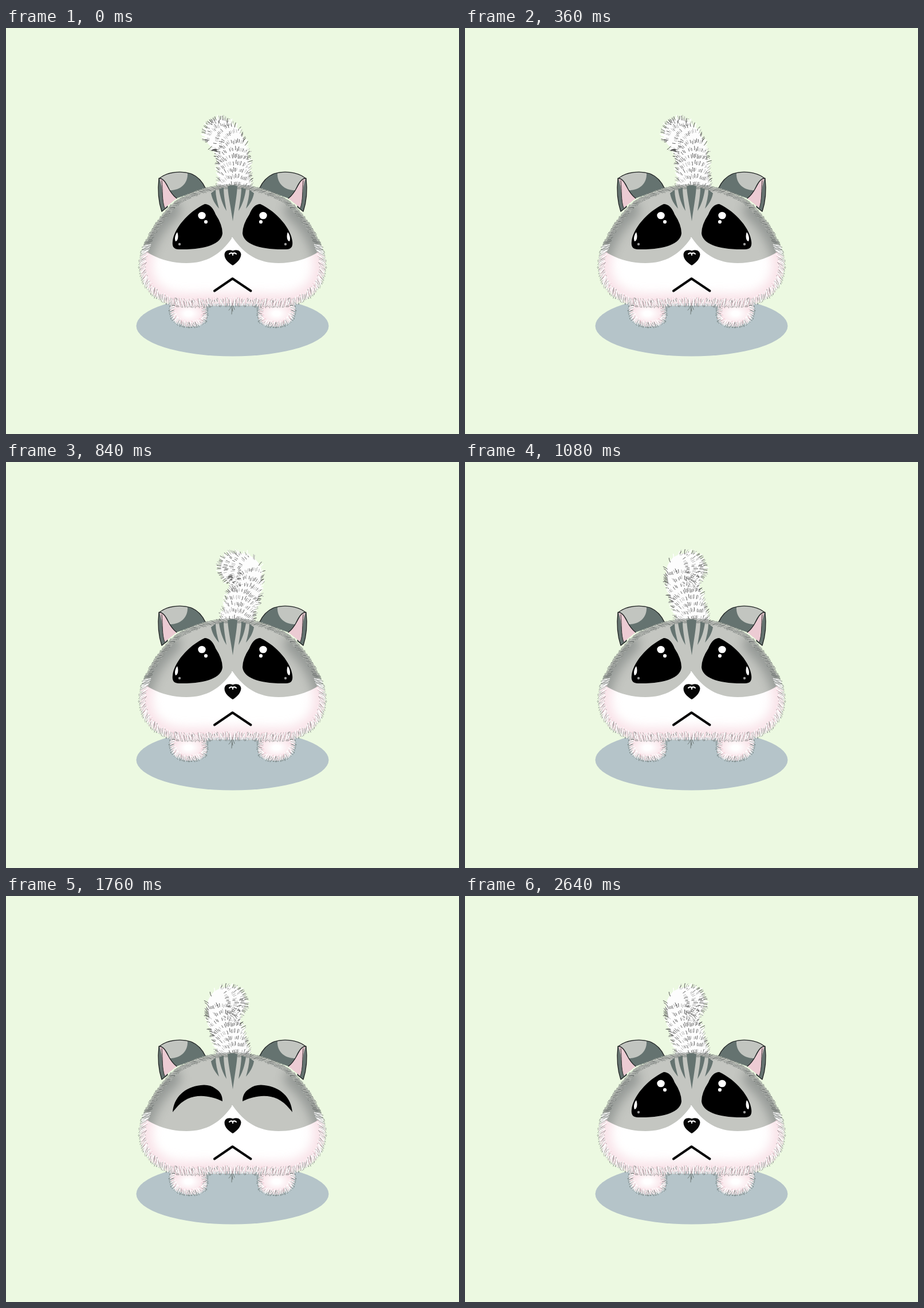
An HTML page for the animation above (3.64 s loop, 791x708 px).

```html
<!DOCTYPE html>
<html lang="en">
<head>
<meta charset="utf-8">
<title>Sad kitten</title>
<style>
html, body { margin: 0; width: 100%; height: 100%; overflow: hidden; background: #ecf9e1; }
svg { display: block; width: 791px; height: 708px; }
</style>
</head>
<body>
<svg id="stage" viewBox="0 0 791 708" fill="none" stroke-linecap="round" stroke-linejoin="round"></svg>
<script>
const NS = 'http://www.w3.org/2000/svg';
const stage = document.getElementById('stage');
const LOOP = 3640, STEP = 60, POSES = 6, WAG_END = 1080;

let seed = 1;
const rnd = () => (seed = seed * 16807 % 2147483647) / 2147483647;
const vary = (a, b) => a + (b - a) * rnd();
const num = v => v.toFixed(1);

const fill = (d, color, more = '') => `<path d="${d}" fill="${color}" ${more}/>`;
const line = (d, color, width, more = '') =>
  `<path d="${d}" stroke="${color}" stroke-width="${width}" ${more}/>`;
const both = html => `<g>${html}</g><g transform="translate(791 0) scale(-1 1)">${html}</g>`;

// A measured path: point, unit tangent and normal at a length
function ruler(d) {
  const path = document.createElementNS(NS, 'path');
  path.setAttribute('d', d);
  const length = path.getTotalLength();
  const at = s => {
    const p = path.getPointAtLength(s);
    const a = path.getPointAtLength(Math.max(0, s - 1));
    const b = path.getPointAtLength(Math.min(length, s + 1));
    const h = Math.hypot(b.x - a.x, b.y - a.y) || 1;
    const tx = (b.x - a.x) / h, ty = (b.y - a.y) / h;
    return { x: p.x, y: p.y, tx, ty, nx: -ty, ny: tx };
  };
  return { length, at };
}

// A bent hair, rooted the given share of its length behind x, y
function hair(x, y, dx, dy, len, root = 0) {
  const k = len / (Math.hypot(dx, dy) || 1), bend = vary(-.15, .15);
  dx *= k;
  dy *= k;
  return `M${num(x - dx * root)} ${num(y - dy * root)}` +
    `q${num(dx / 2 - dy * bend)} ${num(dy / 2 + dx * bend)} ${num(dx)} ${num(dy)}`;
}

// Hairs across an outline; lean(f) tilts them along it
function fur(d, from, to, step, len, lean, root) {
  const r = ruler(d);
  let out = '';
  for (let s = r.length * from; s < r.length * to; s += step * vary(.6, 1.4)) {
    const p = r.at(s), k = lean(s / r.length) + vary(-.2, .2);
    out += hair(p.x, p.y, p.nx + p.tx * k, p.ny + p.ty * k, len * vary(.7, 1.2), root);
  }
  return out;
}

// A wave runs up the tail; the tip trails behind
function tailPath(phase) {
  const pts = [];
  for (let s = 0; s <= 1.001; s += 1 / 16) {
    const late = s ** 4;
    const lag = (100 + 100 * late) * Math.PI / 180;
    const sway = 20 * Math.min(1, 2.2 * s) + 4 * late;
    pts.push(`${num(400 - 4 * late + sway * Math.cos(phase - lag))} ${num(185 + 103 * (1 - s) ** 1.8)}`);
  }
  return 'M' + pts.join('L');
}

function tail(_, i) {
  seed = 77;
  const d = tailPath(i * 2 * Math.PI / POSES), r = ruler(d);
  const coat = { dark: '', mid: '', white: '' };
  const add = h => {
    const k = rnd();
    coat[k < .42 ? 'dark' : k < .7 ? 'mid' : 'white'] += h;
  };
  for (let s = 2; s < r.length + 24; s += 12) {
    const over = Math.max(0, s - r.length), half = Math.sqrt(26 ** 2 - over ** 2);
    const p = r.at(Math.min(s, r.length));
    for (let u = -1; u <= 1; u += .09) {
      const w = u * half, back = over - 9 * u * u + vary(-1.8, 1.8);
      add(hair(p.x + p.nx * w + p.tx * back, p.y + p.ny * w + p.ty * back,
        p.tx + p.nx * u * .9, p.ty + p.ny * u * .9, vary(4, 7)));
    }
  }
  const edge = (p, nx, ny) => {
    const k = vary(.1, .9);
    add(hair(p.x + nx * 25, p.y + ny * 25, nx + p.tx * k, ny + p.ty * k, vary(4, 9)));
  };
  for (let s = 0; s < r.length; s += 2) {
    const p = r.at(s);
    edge(p, p.nx, p.ny);
    edge(p, -p.nx, -p.ny);
  }
  const tip = r.at(r.length);
  for (let a = -1.5; a < 1.5; a += .075) {
    const c = Math.cos(a), n = Math.sin(a);
    edge(tip, tip.tx * c + tip.nx * n, tip.ty * c + tip.ny * n);
  }
  return `<g class="tail">${line(d, '#fdfdfd', 53)}${line(coat.mid, '#b0b0b0', 1)}` +
    `${line(coat.dark, '#555', 1)}${line(coat.white, '#fff', 1.5)}</g>`;
}

const side = 'M395.5 275C355 276 318 288 293 308C263 336 241 375 237 405' +
  'C234 440 250 465 285 478C315 485 350 480 395.5 480';
const half = side + 'H397V275Z';
const mask = 'M395.5 365C375 395 350 410 315 410C283 410 258 400 236 384L200 260H397V365Z';
const foot = 'M291 478C285 498 292 517 318 518C343 519 350 510 348 496L347 482';

function ears() {
  const flap = 'M268 262C283 250 307 249 323 254C335 259 343 268 348 279';
  const fold = 'C282 264 281 285 298 297';
  return both(
    fill('M267 262C265 280 266 302 272 320L282 312L273 265Z', '#657370', 'stroke="#1d2020" stroke-width="1.3"') +
    fill(`M268 262${fold}L277 314C272 300 275 282 268 262Z`, '#eccbd3') +
    line('M272 266C274 285 272 300 277 314', '#2b2b2b', 1) +
    fill(`${flap}L298 297C281 285 282 264 268 262Z`, '#657370') +
    fill('M268 262C281 251 300 250 317 253C318 270 306 283 286 283C282 271 277 265 268 262Z', '#c2c5c0') +
    line(`${flap}M268 262${fold}`, '#1d2020', 1.3)
  );
}

function feet() {
  seed = 31;
  const lean = () => .3;
  return both(
    fill(foot + 'Z', 'url(#paw)') +
    line(fur(foot, 0, 1, 2.2, 10, lean, .5), '#6a7573', .9) +
    line(fur(foot, 0, 1, 3, 10, lean, .75), '#f0cdd6', 1) +
    line(fur(foot, 0, 1, 2.6, 10, lean, .7), '#fff', 1.1)
  ) + line('M393 482q0 8-4 10M395 482l-1 17M397 482q0 6 2 9M394 484l2 10', '#6d7775', 1);
}

function head() {
  seed = 9;
  const lean = f => 1.5 - 1.4 * f;
  const soft = (d, color, width, o) => line(d, color, width, `opacity="${o}" filter="url(#blur)"`);
  return both(
    `<g clip-path="url(#body)">${fill(half, '#fff')}${soft(side, '#f5d3dc', 36, .65)}` +
    `<g clip-path="url(#mask)">${fill(half, '#c4c6c1')}` +
    `${soft('M288 318C262 340 244 370 237 400', '#7d8280', 34, .65)}</g></g>` +
    line(fur(side, 0, .48, 1.8, 13, lean, .65), '#6b706e', .8) +
    line(fur(side, 0, .48, 3.4, 12, lean, .7), '#b9bcb7', 1) +
    line(fur(side, .44, 1, 2.1, 14, lean, .6), '#747977', .8) +
    line(fur(side, .5, 1, 3.4, 13, lean, .72), '#f0cdd6', 1) +
    line(fur(side, .46, 1, 2.8, 13, lean, .7), '#fff', 1.1) +
    fill('M358 288L366 282C366 293 369 304 372 315C365 307 360 299 358 288Z', '#657370') +
    fill('M372 281L380 278C380 292 383 306 385 319C378 308 374 295 372 281Z', '#657370')
  ) + fill('M387 276Q395.5 272 404 276C403 294 399 314 396 337C393 314 388 294 387 276Z', '#657370');
}

const glints = both(
  '<g fill="#fff"><ellipse cx="342" cy="327" rx="6.7" ry="6.3"/>' +
  '<path d="M299 356C295 361 294 368 296 372C300 372 302 363 299 356Z"/></g>' +
  '<circle cx="303" cy="377" r="2.2" fill="#9a9a9a"/>'
) + '<g fill="#fff"><circle cx="349" cy="338" r="3.1"/><circle cx="445" cy="338" r="3.1"/></g>';

const face =
  fill('M396 414C391 411 381 404 381.5 395C382 388 389 385.5 396 388.5C403 385.5 410 388 410.5 395C410 404 401 411 396 414Z', '#050505') +
  line('M390 394Q393 391 396 393.5Q399 391 402 394M396 393V396', '#fff', 2) +
  line('M364 458.5L395.5 437L427.5 458.5', '#050505', 4);

stage.innerHTML = `
<defs>
  <clipPath id="body"><path d="${half}"/></clipPath>
  <clipPath id="mask"><path d="${mask}"/></clipPath>
  <filter id="blur" filterUnits="userSpaceOnUse" x="180" y="220" width="280" height="330">
    <feGaussianBlur stdDeviation="9"/></filter>
  <radialGradient id="paw"><stop offset=".2" stop-color="#fff"/><stop offset="1" stop-color="#f8dfe5"/></radialGradient>
</defs>
<rect width="791" height="708" fill="#ecf9e1"/>
<ellipse cx="395.5" cy="519.5" rx="168" ry="53" fill="#b5c4c9"/>
${Array.from({ length: POSES }, tail).join('')}${ears()}${feet()}${head()}
${both('<path class="eye" fill="#000"/>')}<g id="glints">${glints}</g>${face}`;

const tails = [...stage.querySelectorAll('.tail')];
const eyes = [...stage.querySelectorAll('.eye')];
const shine = document.getElementById('glints');

// Open eye at k = 0, a closed arch at k = 1
function eyePath(k) {
  const to = (a, b) => num(a + (b - a) * k);
  const low = to(387, 343);
  return `M291 ${to(372, 377)}C293 351 ${to(317, 312)} ${to(321, 333)} ${to(347, 340)} ${to(307, 330)}` +
    `Q${to(359, 355)} ${to(307, 328)} 366 ${to(325, 336)}Q378 ${to(343, 343)} 378 358` +
    `C${to(376, 350)} ${to(376, 345)} ${to(350, 318)} ${low} ${to(302, 296)} ${to(386, 371)}` +
    `Q${to(289, 293)} ${to(386, 374)} 291 ${to(372, 377)}Z`;
}

// Three equal steps shut at 1580 ms, three open again at 2460 ms
function lid(t) {
  const steps = from => Math.max(0, Math.min(3, Math.floor((t - from) / 90) + 1));
  return (steps(1580) - steps(2460)) / 3;
}

function draw(t) {
  const pose = t < WAG_END ? Math.floor(t / STEP) % POSES : POSES - 1;
  tails.forEach((g, i) => g.setAttribute('display', i === pose ? 'inline' : 'none'));
  const k = lid(t), d = eyePath(k);
  eyes.forEach(e => e.setAttribute('d', d));
  shine.setAttribute('display', k ? 'none' : 'inline');
}

let start;
function tick(now) {
  start ??= now;
  draw((now - start) % LOOP);
  requestAnimationFrame(tick);
}
draw(0);
requestAnimationFrame(tick);
</script>
</body>
</html>
```
